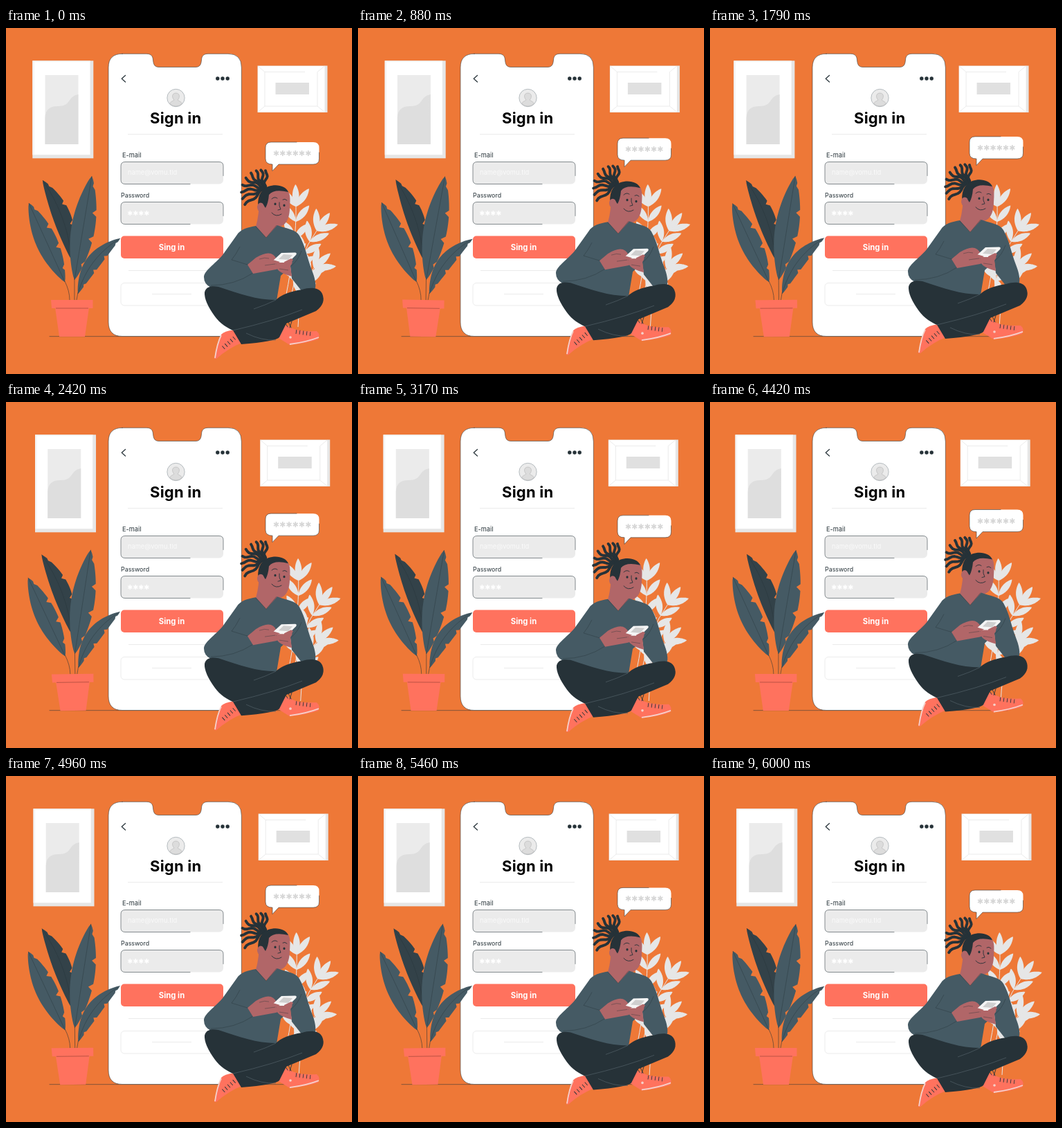
An HTML page for the animation above (6.04 s loop, 500 by 500 pixels).

```html
<!DOCTYPE html>
<html lang="en">
<head>
<meta charset="utf-8">
<title>Sign in</title>
<style>
  html, body { margin: 0; height: 100%; overflow: hidden; background: #ee7837; }
  svg { display: block; width: 100vw; height: 100vh; }
  text { font-family: Inter, "Open Sans", sans-serif; }
  .stars { font-family: "DejaVu Sans", sans-serif; font-weight: bold; }
  .line { fill: none; stroke: #263238; stroke-width: .55; stroke-linecap: round; stroke-linejoin: round; }
  .face { stroke-width: .9; }
  .pale { fill: none; stroke: #e6e6e6; stroke-width: .8; }
  .skin { fill: #b16668; }
  .dark { fill: #263238; }
  .slate { fill: #455a64; }
  .coral { fill: #ff725e; }
  .vein { fill: none; stroke: #263238; stroke-width: .6; opacity: .65; }
  .lace { fill: none; stroke: #263238; stroke-width: 6; stroke-dasharray: .9 4.2; }
</style>
</head>
<body>
<svg viewBox="0 0 500 500">
  <g class="shake">
    <!-- portrait picture -->
    <rect x="38.300" y="47.300" width="88" height="141" fill="#e6e6e6"/>
    <rect x="38.300" y="47.300" width="83.500" height="136" fill="#f5f5f5"/>
    <rect x="41" y="49" width="80" height="134" fill="#fff"/>
    <rect x="56.500" y="68" width="48" height="100" fill="#ebebeb"/>
    <path fill="#dedede" d="M56.500 168V130C57 117 64 113 75 113C95 113 88 99 104.500 96V168z"/>
    <!-- landscape picture -->
    <rect x="363.500" y="54.500" width="101" height="67.500" fill="#e6e6e6"/>
    <rect x="364" y="55" width="96.500" height="66.500" fill="#fff"/>
    <path class="pale" d="M374 113V63.500H432M450 63.500V113H374M364 55l10 8.500M460.500 55L450 63.500M364 121.500l10-8.500M460.500 121.500L450 113"/>
    <rect x="389.500" y="79" width="48.500" height="17" fill="#e0e0e0"/>
  </g>

  <path class="line" d="M63 445.700H430"/>

  <!-- phone -->
  <path class="line" style="fill:#fff" d="M168 37.300H203C209 37.300 212 40 212.500 46C213 53 215 56.500 221 56.500H274C280 56.500 282 53 282.500 46C283 40 286 37.300 292 37.300H321Q340.300 37.300 340.300 57V425Q340.300 445.500 320 445.500H168Q148 445.500 148 425V57Q148 37.300 168 37.300z"/>
  <path class="line" style="stroke-width:1.200" d="M172.500 68.500L167.200 73.300L172.500 78"/>
  <path class="line" style="stroke-width:5.400;stroke-dasharray:0 7.200" d="M305.800 73H321"/>
  <circle cx="245.500" cy="101" r="12.700" fill="#ebebeb" stroke="#78858c" stroke-width=".5"/>
  <path fill="#dcdcdc" stroke="#aaa" stroke-width=".5" d="M237 110C237 106 241 106 243 104C239 100 240 94 245.500 94C251 94 252 100 248 104C250 106 254 106 254 110Q245.500 116 237 110z"/>
  <text x="245.200" y="137.500" font-size="22" font-weight="700" letter-spacing=".2" text-anchor="middle">Sign in</text>
  <path class="pale" d="M176 153.500H313M177 350.500H310M211 384.500H268"/>
  <text x="168" y="187.300" font-size="9.200" fill="#263238">E-mail</text>
  <text x="166" y="245.300" font-size="8.900" fill="#263238">Password</text>
  <g id="fields"></g>
  <text x="176" y="212" font-size="9.300" fill="#fafafa">name@vomu.tld</text>
  <text class="stars" x="175.500" y="270.500" font-size="9.500" fill="#fff">✱✱✱✱</text>
  <rect class="coral" x="166" y="300.500" width="148" height="32.500" rx="5"/>
  <text x="239.500" y="320.500" font-size="11.300" font-weight="700" text-anchor="middle" fill="#fff">Sing in</text>
  <rect class="pale" x="166" y="368.500" width="148" height="32.500" rx="5"/>

  <g id="plant">
    <path class="line" d="M85 366Q92 380 92 393M99 362V393M104 382L102 393"/>
    <g id="blades"></g>
    <path class="coral" d="M71 404H120L114 446H77z"/>
    <path class="coral" d="M65 393H125.500V405H66z"/>
    <path fill="none" stroke="#b34f41" stroke-width=".9" d="M72 405H119"/>
  </g>

  <g class="shake" id="foliage" fill="#e6e6e6"></g>

  <!-- sitting man and speech bubble -->
  <g id="man">
    <path fill="#fff" d="M383 165H444Q452.500 165 452.500 173V189Q452.500 197 444 197H394L385 206.500V197Q375 197 375 189V173Q375 165 383 165z"/>
    <path class="line" d="M420 165H383Q375 165 375 173V189Q375 197 385 197V206.500L394 197H444Q452.500 197 452.500 189V180"/>
    <text class="stars" x="385.800" y="185" font-size="11" fill="#d6d6d6">✱✱✱✱✱✱</text>

    <!-- head -->
    <g id="dreads" fill="none" stroke="#263238" stroke-width="3.900" stroke-linecap="round" stroke-linejoin="round"></g>
    <path class="skin" d="M366 246Q366 270 361 287L376 303L392 287C404 288 410 275 410 260C411 245 411 238 405 233C390 226 370 232 366 246z"/>
    <path class="dark" d="M365 264C362 245 367 234 379 229C391 225 404 228 408 237Q387 232 380 241Q379 253 375 260L370 253z"/>
    <ellipse class="skin" cx="368" cy="259" rx="5" ry="6.500"/>
    <path class="line face" d="M384 247Q388 243 392 246M400 248Q403 246 406 249M395 252Q394 257 397 262L393 263M384 267Q390 274 398 269"/>
    <path class="line" style="stroke-width:3" d="M389 254v.5M402 256v.5"/>

    <!-- sweater -->
    <path class="slate" d="M361 286C350 288 339 290 333 300L313 328C302 341 286 351 286 360Q286 370 296 375L330 394H391L397 358L411 345L413 362L428 381H445C450 374 446 360 442 350C435 332 433 316 424 300C419 291 405 290 392 285L376 303z"/>
    <path class="vein" d="M361 287L376 303L391 285M338 316Q332 328 326 335L349 342M296 372Q330 372 357 354L349 341M427 322Q422 336 412 344"/>

    <!-- hands and handset -->
    <path class="skin" d="M349 342L361 332Q384 318 391 334L389 340Q397 347 390 349L357 355z"/>
    <path class="skin" d="M411 344L413 359Q386 352 391 339L411 334Q416 338 411 344z"/>
    <path fill="#f5f5f5" d="M386 336L398 325L418 324.500Q421 325 419 328L408 339H388Q385 338 386 336z"/>
    <path fill="#cfcfcf" d="M394 334L401 327L414 328L408 335z"/>
    <path class="skin" d="M379 333L396 338L390 341L380 338zM402 338L412 333L415 335L411 341L402 342z"/>
    <path class="vein" d="M366 334Q374 331 380 333M374 343L389 341M395 348L408 350"/>

    <!-- shoes -->
    <path class="coral" d="M301 478C303 467 306 452 311 443Q315 438 330 436L343 454Q322 462 304 478z"/>
    <path class="coral" d="M394 448L400 432Q405 427 414 434Q425 439 449 438Q455 443 451 450Q432 456 410 458z"/>
    <path fill="none" stroke="#f5d1ca" stroke-width="1.800" d="M302 477Q305 456 311 444M410 457Q434 454 452 447"/>
    <path class="lace" d="M314 462L330 448M419 439L440 442"/>
    <circle cx="411" cy="447" r="1.800" fill="#f5d1ca"/>

    <!-- legs -->
    <path class="dark" d="M287 382C289 374 296 372 307 374C338 384 362 393 390 393Q401 382 428 378C440 374 453 375 457 384Q463 398 448 409L405 427L395 447Q389 453 340 457L328 437C321 434 309 427 302 417Q286 395 287 382z"/>
    <path fill="none" stroke="#526067" stroke-width=".7" d="M390 393Q376 400 358 406M428 407Q388 423 328 437M347 441Q369 452 390 451"/>
    <path class="line face" d="M404 427l3 5M408 425l4 8M413 424l-3 9"/>
  </g>
</svg>
<script>
  const get = id => document.getElementById(id);
  const add = (id, markup) => get(id).insertAdjacentHTML("beforeend", markup);
  const path = (points, attrs = "") => `<path d="M${points.join("L")}" ${attrs}/>`;
  const steps = (n, f) => Array.from({ length: n + 1 }, (_, i) => f(i / n, i));

  // leaf from base to tip: half width w, sideways bow, optional nicks in the right edge
  function leaf(x, y, tipX, tipY, w, bow = 0, nicked = false, attrs = "") {
    const dx = tipX - x, dy = tipY - y, len = Math.hypot(dx, dy);
    const at = side => (k, i) => {
      const nick = nicked && side > 0 && i % 8 === 5 ? .62 : 1;
      const off = bow * 4 * k * (1 - k) + side * w * nick * Math.sin(Math.PI * k) ** .8;
      return [x + dx * k - dy / len * off, y + dy * k + dx / len * off];
    };
    const edge = path([...steps(32, at(-1)), ...steps(32, at(1)).reverse()], attrs);
    return nicked ? edge + path(steps(12, at(0)), 'class="vein"') : edge;
  }

  // curved twig with pairs of leaves and one at its end
  function twig(x0, y0, cx, cy, x1, y1) {
    const mix = (a, b, c, k) => (1 - k) ** 2 * a + 2 * k * (1 - k) * b + k * k * c;
    add("foliage", `<path fill="none" stroke="#e6e6e6" d="M${x0} ${y0}Q${cx} ${cy} ${x1} ${y1}"/>`);
    for (let k = .2; k < 1.01; k += .2) {
      const x = mix(x0, cx, x1, k), y = mix(y0, cy, y1, k);
      const along = Math.atan2((1 - k) * (cy - y0) + k * (y1 - cy), (1 - k) * (cx - x0) + k * (x1 - cx));
      for (const side of k > .99 ? [-1, 0, 1] : [-1, 1]) {
        const a = along + side * .65, len = 24 + 8 * k;
        add("foliage", leaf(x, y, x + len * Math.cos(a), y + len * Math.sin(a), 4.8));
      }
    }
  }

  for (const y of [193.5, 251.5])
    add("fields", `<rect x="166" y="${y}" width="148" height="32" rx="6" fill="#ebebeb"/>
      <path class="line" d="M266 ${y + 32}H172q-6 0-6-6V${y + 6}q0-6 6-6H308q6 0 6 6v14"/>`);

  add("blades", leaf(95, 335, 53, 220, 13, 8, true, 'fill="#334249"'));
  add("blades", leaf(85, 367, 33, 253, 15.5, 0, true, 'class="slate"'));
  add("blades", leaf(99, 364, 124, 214, 17, 0, true, 'class="slate"'));
  add("blades", leaf(104, 384, 165, 304, 10.5, -10, true, 'class="slate"'));

  twig(404, 390, 420, 310, 419, 258);
  twig(412, 388, 422, 330, 449, 293);
  twig(422, 432, 425, 365, 445, 347);

  // wavy strands fanned out from the back of the head
  for (let i = 0; i < 9; i++) {
    const a = (140 + i * 17) * Math.PI / 180, reach = 37 - i * 1.4;
    add("dreads", path(steps(10, k => {
      const r = reach * k, sway = 1.8 * Math.sin(k * 9 + i);
      return [374 + r * Math.cos(a) - sway * Math.sin(a), 232 + r * Math.sin(a) + sway * Math.cos(a)];
    })));
  }

  // straight runs between evenly spaced values, p in 0..1
  function tween(p, values) {
    const s = p * (values.length - 1), i = Math.min(Math.floor(s), values.length - 2);
    return values[i] + (values[i + 1] - values[i]) * (s - i);
  }
  const shaken = document.querySelectorAll(".shake");

  function draw() {
    const t = Math.min(performance.now() % 6040, 6000);
    const half = t % 3000 / 3000;
    const mirrored = Math.min(t, 6000 - t) / 3000;
    const shift = tween(mirrored, [0, -1, 2, -4, 4, -4]);
    shaken.forEach(g => g.setAttribute("transform", `translate(${shift} 0)`));
    get("plant").setAttribute("transform", `rotate(${tween(half, [0, 1, 0, -1, 0])} 98.5 330)`);
    get("man").setAttribute("transform", `translate(0 ${tween(half, [0, -10, 0])})`);
    requestAnimationFrame(draw);
  }
  draw();
</script>
</body>
</html>
```
